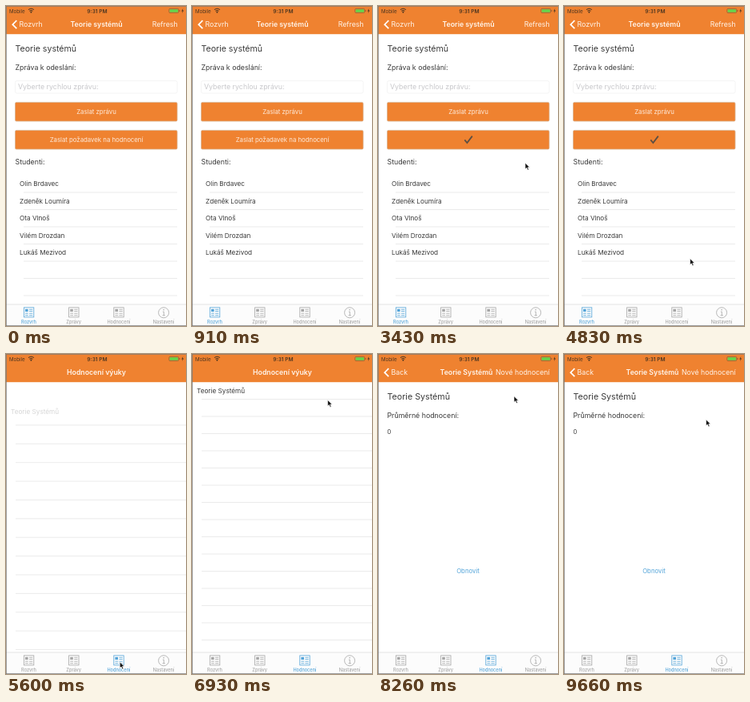
These frames come from a looping animation (225 px wide and 400 px high, 9.73 s). An HTML page:

```html
<!DOCTYPE html>
<html lang="cs">
<head>
<meta charset="utf-8">
<style>
  html, body { margin: 0; width: 100%; height: 100%; overflow: hidden; background: #fff; }
  svg { display: block; width: 100vw; height: 100vh; font-family: Inter, Roboto, sans-serif; }
</style>
</head>
<body>
<svg id="stage" viewBox="0 0 225 400"></svg>
<script>
const LOOP = 9730;
const ORANGE = '#ef8230', BLUE = '#55a5d9', GREY = '#a6a6a6', INK = '#3a3a3a', RULE = '#e6e6e6';
const NAV_TEXT = '#fff4ea', STATUS = '#4b3520';
const TAB_SWITCH = 5530, PUSH = 7420;

const text = (x, y, size, label, fill = INK, extra = '') =>
  `<text x="${x}" y="${y}" font-size="${size}" fill="${fill}" ${extra}>${label}</text>`;
const rect = (x, y, w, h, fill, extra = '') =>
  `<rect x="${x}" y="${y}" width="${w}" height="${h}" fill="${fill}" ${extra}/>`;
const path = (d, stroke, width = 1, extra = '') =>
  `<path d="${d}" fill="none" stroke="${stroke}" stroke-width="${width}" ${extra}/>`;
const group = (id, content) => `<g id="${id}">${content}</g>`;
const MIDDLE = 'text-anchor="middle"', END = 'text-anchor="end"';
const rule = (x1, x2, y) => path(`M${x1} ${y}H${x2}`, RULE, 0.8);

const navTitle = (x, label) => text(x, 26.4, 8.75, label, NAV_TEXT, MIDDLE + ' font-weight="600"');
const navBack = label =>
  path('M13.3 18.2L8.3 23.2L13.3 28.2', '#fff', 1.7) + text(16.5, 26.4, 8.8, label, NAV_TEXT);
const navAction = label => text(214.6, 26.4, 8.75, label, NAV_TEXT, END);

function scheduleScreen() {
  const students = ['Olin Brdavec', 'Zdeněk Loumíra', 'Ota Vlnoš', 'Vilém Drozdan', 'Lukáš Mezivod'];
  const button = (y, content) =>
    rect(11.5, y + 0.4, 202.5, 23.6, ORANGE, 'rx="1.5" stroke="#d9b08c" stroke-width=".8"') + content;
  let out = text(11.5, 57, 10.6, 'Teorie systémů')
    + text(11.5, 79.7, 8.8, 'Zpráva k odeslání:')
    + rect(11.5, 93.5, 202.5, 15.5, '#fff', 'rx="2" stroke="#f1f1f1" stroke-width=".8"')
    + text(15, 104.2, 8.85, 'Vyberte rychlou zprávu:', '#c8c8cb')
    + button(120, text(113, 134.9, 7.8, 'Zaslat zprávu', '#fdeadb', MIDDLE))
    + button(155, group('request', text(113, 169.9, 7.8, 'Zaslat požadavek na hodnocení', '#fdeadb', MIDDLE))
      + group('check', path('M108.3 167.3L111.4 171L117.8 162.6', '#5e4f42', 1.8)))
    + text(11.5, 198.2, 8.8, 'Studenti:');
  students.forEach((name, i) => out += text(17, 225.2 + i * 21.5, 8.2, name));
  for (let i = 0; i < 7; i++) out += rule(22, 214, 233 + i * 21.5);
  return out;
}

const detailScreen = () => rect(0, 35, 225, 338, '#fff')
  + text(11.5, 57, 10.7, 'Teorie Systémů')
  + text(11.5, 79.7, 8.8, 'Průměrné hodnocení:')
  + text(11.5, 100.4, 7.6, '0')
  + text(112.5, 274.2, 7.8, 'Obnovit', BLUE, MIDDLE);

const newsIcon = x => `<g transform="translate(${x - 6.5} 376.5)">`
  + rect(0.4, 0.4, 12.4, 12, 'none', 'stroke="currentColor" stroke-width=".8"')
  + rect(2, 2.3, 3.6, 3.3, 'currentColor')
  + path('M7 2.8H11.3M7 5H11.3M2 7.7H5.8M7 7.7H11.3M2 10.2H5.8M7 10.2H11.3', 'currentColor', 0.8) + '</g>';
const infoIcon = x => `<circle cx="${x}" cy="383.3" r="6.5" fill="none" stroke="currentColor" stroke-width=".8"/>`
  + path(`M${x - 1.2} 382.2H${x + 0.2}V386.8M${x - 1.5} 386.8H${x + 1.8}`, 'currentColor', 0.8)
  + `<circle cx="${x}" cy="379.8" r=".8" fill="currentColor"/>`;
const tabs = ['Rozvrh', 'Zprávy', 'Hodnocení', 'Nastavení'].map((label, i) => {
  const x = 28.5 + i * 56.2;
  return group('tab' + i, (i < 3 ? newsIcon : infoIcon)(x)
    + text(x, 397, 5.6, label, 'currentColor', MIDDLE + ' font-weight="500"'));
}).join('');

const statusBar = text(4, 8.5, 6.2, 'Mobile', STATUS)
  + path('M28 4.7Q31.4 1.8 34.8 4.7M29.4 6.3Q31.4 4.6 33.4 6.3', STATUS, 1.1)
  + `<circle cx="31.4" cy="7.8" r="1" fill="${STATUS}"/>`
  + text(114, 8.5, 6.6, '9:31 PM', STATUS, MIDDLE + ' font-weight="600"')
  + rect(203.8, 3.4, 12, 5.2, 'none', 'rx="1.2" stroke="#75583c" stroke-width=".6"')
  + rect(204.6, 4.2, 10.4, 3.6, '#62d44c', 'rx=".6"')
  + rect(216.5, 5, 0.8, 2, '#75583c')
  + `<path d="M221.3 3L219.3 6.4H220.7L220 9L222.2 5.4H220.8Z" fill="${STATUS}"/>`;

document.getElementById('stage').innerHTML = rect(0, 0, 225, 400, '#fff')
  + group('schedule', scheduleScreen())
  + group('ratings', rect(0, 35, 225, 338, '#fff') + group('rows', '') + text(6, 0, 8.2, 'Teorie Systémů', INK, 'id="course"'))
  + group('detail', detailScreen())
  + rect(0, 0, 225, 35.2, ORANGE)
  + statusBar
  + group('navSchedule', navBack('Rozvrh') + navTitle(113, 'Teorie systémů') + navAction('Refresh'))
  + group('navRatings', navTitle(113, 'Hodnocení výuky'))
  + group('navDetail', navBack('Back') + navTitle(110.5, 'Teorie Systémů') + navAction('Nové hodnocení'))
  + rect(0, 373, 225, 27, '#fcfcfc') + path('M0 373H225', '#d8d8d8', 0.7)
  + tabs
  + path('M.4 0V400M0 .3H225M0 399.6H225', '#777', 0.8)
  + group('cursor', '<path d="M0 0V7.6L1.8 6L3.1 8.9L4.5 8.3L3.2 5.5H5.6Z" fill="#111" stroke="#fff" stroke-width=".6"/>');

const el = id => document.getElementById(id);
const clamp = v => Math.min(1, Math.max(0, v));
const smooth = v => v * v * (3 - 2 * v);
const easeOut = v => 1 - (1 - v) ** 3;
const show = (id, opacity) => {
  el(id).style.opacity = opacity;
  el(id).style.display = opacity > 0 ? '' : 'none';
};
const move = (id, x, y = 0) => el(id).setAttribute('transform', `translate(${x} ${y})`);

// time, x, y of the pointer tip
const pointer = [
  [900, 228, 196], [1600, 191.8, 168.5], [2700, 191.8, 168.5], [3300, 184, 196.2],
  [4300, 184, 196.2], [5200, 142.3, 385], [5900, 142.3, 385], [6850, 169.6, 57.5],
  [6950, 169.6, 57.5], [7200, 170, 52.7], [8450, 170, 52.7], [9300, 177.6, 82]
];

function drawPointer(t) {
  show('cursor', t >= pointer[0][0] ? 1 : 0);
  const next = pointer.findIndex(p => p[0] > t);
  const b = pointer[next < 0 ? pointer.length - 1 : next];
  const a = next > 0 ? pointer[next - 1] : b;
  const k = a === b ? 0 : smooth((t - a[0]) / (b[0] - a[0]));
  move('cursor', a[1] + (b[1] - a[1]) * k, a[2] + (b[2] - a[2]) * k);
}

function drawRatings(t) {
  const lift = 1 - easeOut(clamp((t - 5600) / 350));
  const step = 21.5 + 1.9 * lift;
  let lines = '';
  for (let y = 56.5 + 32.7 * lift; y < 373; y += step) lines += rule(12, 225, y);
  el('rows').innerHTML = lines;
  el('course').setAttribute('y', 49 + 26.7 * lift);
  el('course').style.opacity = 1 - 0.8 * lift;
}

function draw(t) {
  const onRatings = t >= TAB_SWITCH;
  const push = easeOut(clamp((t - PUSH) / 480));

  show('schedule', onRatings ? 0 : 1);
  show('navSchedule', onRatings ? 0 : 1);
  const sent = clamp((t - 2350) / 200);
  show('request', 1 - sent);
  show('check', sent);

  show('ratings', onRatings && push < 1 ? 1 : 0);
  show('navRatings', onRatings ? 1 - push : 0);
  show('detail', push > 0 ? 1 : 0);
  show('navDetail', push);
  if (onRatings && push < 1) drawRatings(t);
  move('ratings', -68 * push);
  move('navRatings', -80 * push);
  move('detail', 225 * (1 - push));
  move('navDetail', 60 * (1 - push));

  for (let i = 0; i < 4; i++) el('tab' + i).style.color = i === (onRatings ? 2 : 0) ? BLUE : GREY;
  drawPointer(t);
}

const start = performance.now();
function frame() {
  draw((performance.now() - start) % LOOP);
  requestAnimationFrame(frame);
}
frame();
</script>
</body>
</html>
```
